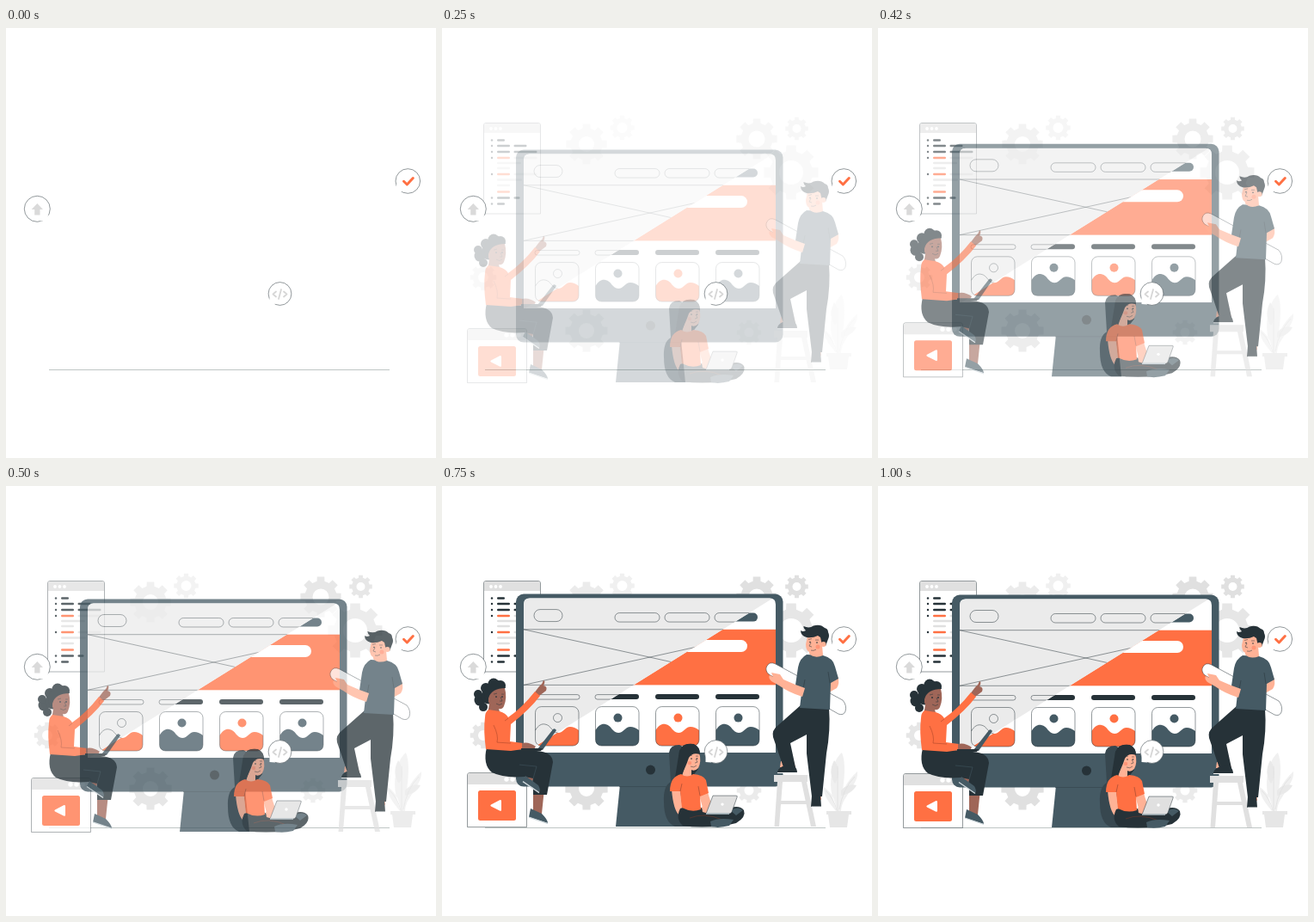
Write an HTML page that moves like this. It is 500 px wide and 500 px high and loops after 1040 ms.

```html
<!DOCTYPE html>
<html lang="en">
<head>
<meta charset="utf-8">
<title>Building a web page</title>
<style>
  html, body { margin: 0; width: 100%; height: 100%; overflow: hidden; background: #fff; }
  svg { display: block; width: 100vw; height: 100vh; }
  .ink { fill: #263238; }
  .slate { fill: #455a64; }
  .orange { fill: #ff7043; }
  .gray { fill: #e0e0e0; }
  .white { fill: #fff; }
  .skin { fill: #ffb296; }
  .brown { fill: #9f6658; }
  .thin { stroke: #263238; stroke-width: .5; }
  .line { fill: none; stroke: #263238; stroke-width: .5; }
  .round { fill: none; stroke-linecap: round; stroke-linejoin: round; }
</style>
</head>
<body>
<svg viewBox="0 0 500 500">
  <defs>
    <clipPath id="screen"><path d="M95 311V138.500q0-7 7-7H381q7 0 7 7V311z"/></clipPath>
    <clipPath id="built"><path d="M385.500 131 95 312H389V131z"/></clipPath>
    <clipPath id="draft"><path d="M385.500 131 95 312V131z"/></clipPath>
  </defs>

  <path d="M50 397.500H446" stroke="#bfc6c5" fill="none"/>

  <g class="fade" id="gears"></g>

  <g class="fade" id="plant">
    <path fill="#f0f0f0" d="M459 378C453 362 449 346 455 328C457 320 460 314 465 310C471 325 467 350 462 378zM462 378C462 358 470 344 483 332C484 343 476 349 474 355C470 363 465 366 464 378zM459 378C457 362 452 356 444 350C443 360 451 369 458 378z"/>
    <path fill="#e9e9e9" d="M457 346C451 338 451 328 456 319C462 326 463 338 457 346zM464 354C469 348 476 346 482 348C478 356 470 359 464 360z"/>
    <path d="M460 378V326M462 376Q466 352 480 338M459 377Q456 364 446 354" fill="none" stroke="#e0e0e0" stroke-width=".8"/>
    <path fill="#e6e6e6" d="M447 378H476V382H473L471 397H451L449 382H447z"/>
  </g>

  <g class="fade" id="code">
    <path class="white thin" d="M48.500 216V113q0-2.500 2.500-2.500H112q2.500 0 2.500 2.500V216z"/>
    <path class="gray" d="M49 122V113q0-2 2-2H112q2 0 2 2V122z"/>
    <g class="white"><circle cx="57" cy="117" r="1.900"/><circle cx="62.500" cy="117" r="1.900"/><circle cx="68" cy="117" r="1.900"/></g>
  </g>

  <g class="rise">
    <path class="white thin" d="M29.500 397.500V337q0-2.500 2.500-2.500H96q2.500 0 2.500 2.500V397.500z"/>
    <path class="gray" d="M30 348V337q0-2 2-2H96q2 0 2 2V348z"/>
    <g class="white"><circle cx="75" cy="342" r="2.700"/><circle cx="82" cy="342" r="2.700"/><circle cx="89" cy="342" r="2.700"/></g>
    <rect class="orange" x="42" y="355" width="44" height="35" rx="2.500"/>
    <path class="white" d="M57 371.500 67 366.200Q69 365.500 69 367.500V377.500Q69 379.500 67 378.500L57 373.500Q55.500 372.500 57 371.500z"/>
  </g>

  <g class="rise">
    <path class="slate" d="M207 348H278L283 397H202z"/>
    <rect class="slate" x="86" y="126.500" width="310.500" height="224" rx="9"/>
    <path d="M206 350.500H278" stroke="#37474f" stroke-width=".7"/>
    <circle class="ink" cx="242.500" cy="331" r="5.500"/>
    <g clip-path="url(#screen)">
      <rect class="white" x="94" y="131" width="295" height="181"/>
      <g id="page" clip-path="url(#built)">
        <rect class="slate" x="317" y="148.500" width="50" height="10" rx="5"/>
        <rect class="orange" x="95" y="167.700" width="293" height="64.600"/>
        <rect class="white" x="190" y="180" width="165" height="14" rx="7"/>
      </g>
      <g id="wire" clip-path="url(#draft)">
        <rect fill="#ebebeb" x="94" y="131" width="295" height="181"/>
        <path class="line" d="M95 167.700H388M95 232.300H388M95 167.700 388 232.300M95 232.300 388 167.700"/>
      </g>
    </g>
  </g>

  <g class="rise">
    <path class="gray" d="M386 337H425V345H386zM390 345H396L392 397H386.500zM418 345H424L435 397H429zM391 367H427V371H391z"/>
  </g>

  <g class="rise">
    <path class="white thin" d="M387 207.500 466 250Q471 256 469 263Q467 268 461 266L380 220Q375 215 378 210Q381 205 387 207.500z"/>
    <path class="skin" d="M451 225 460 222Q463 230 459 236L450 241z"/>
    <path class="skin" d="M393 328H411L409 321H394zM430 355H441V366H431z"/>
    <path class="ink" d="M417 256 450 259Q452 285 447 312L442 362H430L424 312L424 290L405 300L411 328H397L385 293Q383 285 391 279z"/>
    <path class="ink" d="M396 327 409 325Q413 330 413 334H390Q390 330 396 327zM430 361 440 360 441 374H429z"/>
    <path d="M390 334.500H413M429.500 374H441" stroke="#fff" stroke-width="1" fill="none"/>
    <path class="slate" d="M424 197 443 198Q455 201 457 211L461 225L452 230L451 261L416 259L418 242L410 239L414 212Q416 201 424 197z"/>
    <path d="M419 242 422 226M451 230 449 217" class="line"/>
    <path class="skin" d="M411 232 422 236L419 246Q403 241 392 233L383 228Q379 224 381 221L385 223L383 218L393 220L397 226Z"/>
    <path class="skin" d="M426 171Q434 166 443 171Q447 179 442 186L443 198Q433 202 427 196L427 194Q423 192 423 185z"/>
    <path class="ink" d="M424 177Q417 175 417 169Q420 171 423 169Q420 166 420.500 164Q427 167 432 163.500Q440 161 445 166Q449 167 449 171Q451 175 449 179L446 187L442 186L440 177L437 175Q431 178 424 177z"/>
    <path class="line" d="M426 179.500 430 178.500M434 180 438 180M429 183 427 187 430 188M429 192Q432 193 435 191"/>
    <circle class="ink" cx="428" cy="182.500" r=".8"/><circle class="ink" cx="436" cy="183" r=".8"/>
    <circle class="skin" cx="443.500" cy="185" r="3"/>
    <circle cx="437" cy="188" r="2.500" fill="#ff9577"/>
  </g>

  <g class="rise">
    <path class="brown" d="M106 353H119L116 382H106zM96 337 108 335 104 347H97z"/>
    <path class="ink" d="M52 305 80 307L110 309Q128 310 129 322L122 360H106L106 341L96 339Q72 341 58 334Q47 325 52 305z"/>
    <path class="line" d="M106 341 110 327 90 325" style="stroke:#455a64"/>
    <path class="slate" d="M97 338 112 349Q115 354 113 357L94 344zM103 376 116 382Q123 389 123 393L101 386z"/>
    <path d="M94 344.500 113 357.500M101 386 123 393.500" stroke="#cfd8dc" stroke-width="1.300" fill="none"/>
    <g class="ink">
      <circle cx="44" cy="250" r="6.500"/><circle cx="42" cy="243" r="5"/><circle cx="48" cy="258" r="5"/>
      <circle cx="51" cy="236" r="6"/><circle cx="60" cy="231" r="6.500"/><circle cx="68" cy="233" r="6"/><circle cx="54" cy="246" r="8.500"/>
    </g>
    <path class="brown" d="M57 239Q66 230 73 236Q76 247 72 257Q70 261 66 260L68 267L53 267L55 254Q51 248 57 239z"/>
    <path class="ink" d="M54 248Q57 236 74 236Q72 228 62 226Q49 229 49 248L54 252z"/>
    <path class="line" d="M60 243 64 242M69 243 72 243M68 246 70 251 67 251M63 254Q67 257 70 254"/>
    <circle class="ink" cx="63" cy="246" r=".9"/><circle class="ink" cx="70" cy="246" r=".9"/>
    <path class="brown" d="M107 242 113 234Q117 231 118 227Q120 227 119 231L118 233Q123 234 121 239L113 245z"/>
    <path class="orange" d="M54 261 67 263Q74 265 77 270Q93 259 108 240L114 245Q102 261 80 278L79 298L94 300V307L80 309L51 307Q48 285 50 270Q50 264 54 261z"/>
    <path class="line" d="M60 279Q66 291 64 299L80 300M77 271 73 274" style="stroke:#9f3f24"/>
    <path class="brown" d="M93 300Q101 298 109 304L107 307H93z"/>
    <path class="slate" d="M111 307 129 284Q131 282 133 285L117 308z"/>
    <path class="ink" d="M92 306H117L115 309H92z"/>
  </g>

  <g class="rise">
    <path fill="#37474f" d="M264 311Q265 302 276 302L290 310V397H271Q258 392 258 368Q257 350 266 345z"/>
    <path class="ink" d="M276 309Q280 299 291 301Q300 303 300 314L298 330L290 340L273 340Q276 325 276 309z"/>
    <path class="skin" d="M283 309Q292 303 299 311Q302 321 298 329Q294 333 290 331V339Q284 345 279 338L282 329z"/>
    <path class="ink" d="M276 309Q282 299 293 301Q300 304 300 313Q291 310 287 317Q283 329 278 337L271 340Z"/>
    <path class="skin" d="M267 354H277L279 370L284 378L276 384Q269 378 267 354zM298 356 308 354L313 370L311 378L303 375z"/>
    <path class="ink" d="M277 376Q290 370 306 377L332 376Q346 371 351 378Q354 386 342 393L329 396Q300 399 280 396Q271 388 277 376z"/>
    <path class="orange" d="M278 336Q285 341 292 336Q304 337 307 343L310 358L300 362L301 377Q290 381 279 375L277 356L265 356Q265 339 278 336z"/>
    <path class="line" d="M277 356 279 347M300 361 298 350M288 387Q305 380 326 389" style="stroke:#7a3a2a"/>
    <path class="slate" d="M312 391Q322 386 339 389L334 396Q322 399 313 397zM335 378Q345 373 350 378L342 384z"/>
    <path class="skin" d="M302 374Q310 373 314 379L310 382 303 380z"/>
    <path class="gray thin" d="M315 361H342Q344 361 343 363L337 380Q336 382 334 382H307z"/>
    <path d="M307 382H334" stroke="#b0bec5" stroke-width="1.500" fill="none"/>
    <circle class="white" cx="326" cy="371" r="1.700"/>
    <path class="line" d="M287 315 291 314M295 315 298 315M295 318 297 322 294 323M289 327Q293 329 296 326"/>
    <circle class="ink" cx="290" cy="318" r=".8"/><circle class="ink" cx="296.500" cy="318" r=".8"/>
    <circle cx="288" cy="323" r="2.200" fill="#ff9577"/>
  </g>

  <g>
    <g class="white thin">
      <circle cx="36.300" cy="210.300" r="15"/><circle cx="467.300" cy="178" r="14.300"/><circle cx="318.500" cy="309" r="13.400"/>
    </g>
    <path class="white" d="M49 217 48.500 224 40 224.500 42 219zM454 182 453.500 190 462 190 460 182zM306.500 314 306.500 321 313 321.500 312 316z"/>
    <path fill="#dadada" d="M36.300 204 43 211H39.500V217.500H33.200V211H29.700z"/>
    <path class="round" d="M462.500 178.300 466.300 182 473.300 174.500" stroke="#ff7043" stroke-width="3"/>
    <path class="round" d="M314 306.500 310.500 309.500 314 312.500M323 306.500 326.500 309.500 323 312.500M320 304 317 315" stroke="#d6d6d6" stroke-width="1.800"/>
  </g>
</svg>
<script>
const $ = id => document.getElementById(id);
const add = (id, html) => $(id).insertAdjacentHTML('beforeend', html);

// Gears: x, y, outer radius, hole radius, colour
function gear(x, y, r, hole, fill) {
  const pts = [];
  for (let i = 0; i < 8; i++) {
    for (const [k, off] of [[.78, -.24], [1, -.18], [1, .18], [.78, .24]]) {
      const a = i * Math.PI / 4 + off;
      pts.push((x + r * k * Math.cos(a)).toFixed(2) + ' ' + (y + r * k * Math.sin(a)).toFixed(2));
    }
  }
  const ring = `M${x - hole} ${y}a${hole} ${hole} 0 1 0 ${2 * hole} 0a${hole} ${hole} 0 1 0 ${-2 * hole} 0z`;
  return `<path fill="${fill}" fill-rule="evenodd" d="M${pts.join('L')}z${ring}"/>`;
}
add('gears', [
  [366, 129, 24, 9.5, '#e0e0e0'], [412.5, 117, 13.5, 5, '#e0e0e0'], [406, 168, 32, 14, '#e6e6e6'],
  [168, 135, 24, 9, '#ebebeb'], [209.5, 116, 14.5, 6, '#f0f0f0'], [168, 352, 25, 9, '#e0e0e0'],
  [357, 354, 14.5, 5.5, '#ebebeb'], [48, 290, 15.5, 6, '#e6e6e6']
].map(g => gear(...g)).join(''));

// Code rows: y, colour and width of the first bar, bullet, colour and width of the second bar
const tone = { d: '#263238', o: '#ff7043', l: '#e0e0e0' };
const bar = (x, y, w, c) => `<rect x="${x}" y="${y - 1.2}" width="${w}" height="2.4" rx="1.2" fill="${tone[c]}"/>`;
add('code', [
  [130.5, 'd', 9, 1], [137, 'd', 15, 1, 'd', 15], [144, 'd', 15, 1, 'd', 27], [151, 'o', 15, 1, 'l', 27],
  [157, 'l', 28, 0], [163, 'l', 15, 0], [170, 'o', 15, 1, 'l', 27], [176.5, 'l', 29, 0],
  [183, 'l', 15, 0], [190.5, 'o', 15, 0], [197.5, 'd', 15, 1, 'd', 7], [204.5, 'd', 9, 1]
].map(([y, c, w, dot, c2, w2]) =>
  bar(64, y, w, c) + (dot ? bar(56.8, y, 2.4, 'd') : '') + (c2 ? bar(83.5, y, w2, c2) : '')).join(''));

// Page parts, once finished and once as a wireframe
const pill = (x, y, w, h, cls) => `<rect x="${x}" y="${y}" width="${w}" height="${h}" rx="${h / 2}" class="${cls}"/>`;
add('wire', pill(107, 144.5, 33, 14, 'line') + [201, 259, 317].map(x => pill(x, 148.5, 52, 10.5, 'line')).join(''));
[108, 178, 248, 318].forEach((x, i) => {
  const frame = `<rect x="${x + .5}" y="257.5" width="50.5" height="45.5" rx="7" class="line"/>`;
  const wave = `M${x + .5} 285C${x + 4} 279 ${x + 8} 277 ${x + 12} 278C${x + 19} 279 ${x + 20} 288 ${x + 27} 288C${x + 33} 288 ${x + 35} 281 ${x + 41} 281Q${x + 46} 281 ${x + 51} 285`;
  const sun = cls => `<circle cx="${x + 26.5}" cy="270.5" r="5" class="${cls}"/>`;
  const fill = i % 2 ? 'slate' : 'orange';
  add('page', pill(x, 243, 51, 6, 'ink') + sun(fill) +
    `<path class="${fill}" d="${wave}V296q0 7-7 7H${x + 7.5}q-7 0-7-7z"/>` + frame);
  add('wire', pill(x, 243.5, 52, 5.5, 'line') + sun('line') + `<path class="line" d="${wave}"/>` + frame);
});

// Cubic bezier (.36, -.01, .5, 1.38), solved by bisection
function ease(x) {
  if (x <= 0 || x >= 1) return x <= 0 ? 0 : 1;
  const curve = (t, a, b) => 3 * (1 - t) * (1 - t) * t * a + 3 * (1 - t) * t * t * b + t * t * t;
  let lo = 0, hi = 1;
  for (let i = 0; i < 30; i++) {
    const mid = (lo + hi) / 2;
    if (curve(mid, .36, .5) < x) lo = mid; else hi = mid;
  }
  return curve(lo, -.01, 1.38);
}

const LOOP = 1040, FPS = 24, LIFT = 19.5;
const LEAD = 6; // steps begin on the 10 ms mark just before each 1/24 s
const rising = document.querySelectorAll('.rise');
const fading = document.querySelectorAll('.fade');

function draw(ms) {
  const step = Math.floor((ms + LEAD) * FPS / 1000);
  const p = step < 2 ? 0 : ease(step / FPS);
  const alpha = Math.max(0, Math.min(1, p));
  for (const g of fading) g.setAttribute('opacity', alpha);
  for (const g of rising) {
    g.setAttribute('opacity', alpha);
    g.setAttribute('transform', `translate(0 ${LIFT * (1 - p)})`);
  }
}

const origin = performance.now();
function tick() {
  draw((performance.now() - origin) % LOOP);
  requestAnimationFrame(tick);
}
tick();
</script>
</body>
</html>
```
